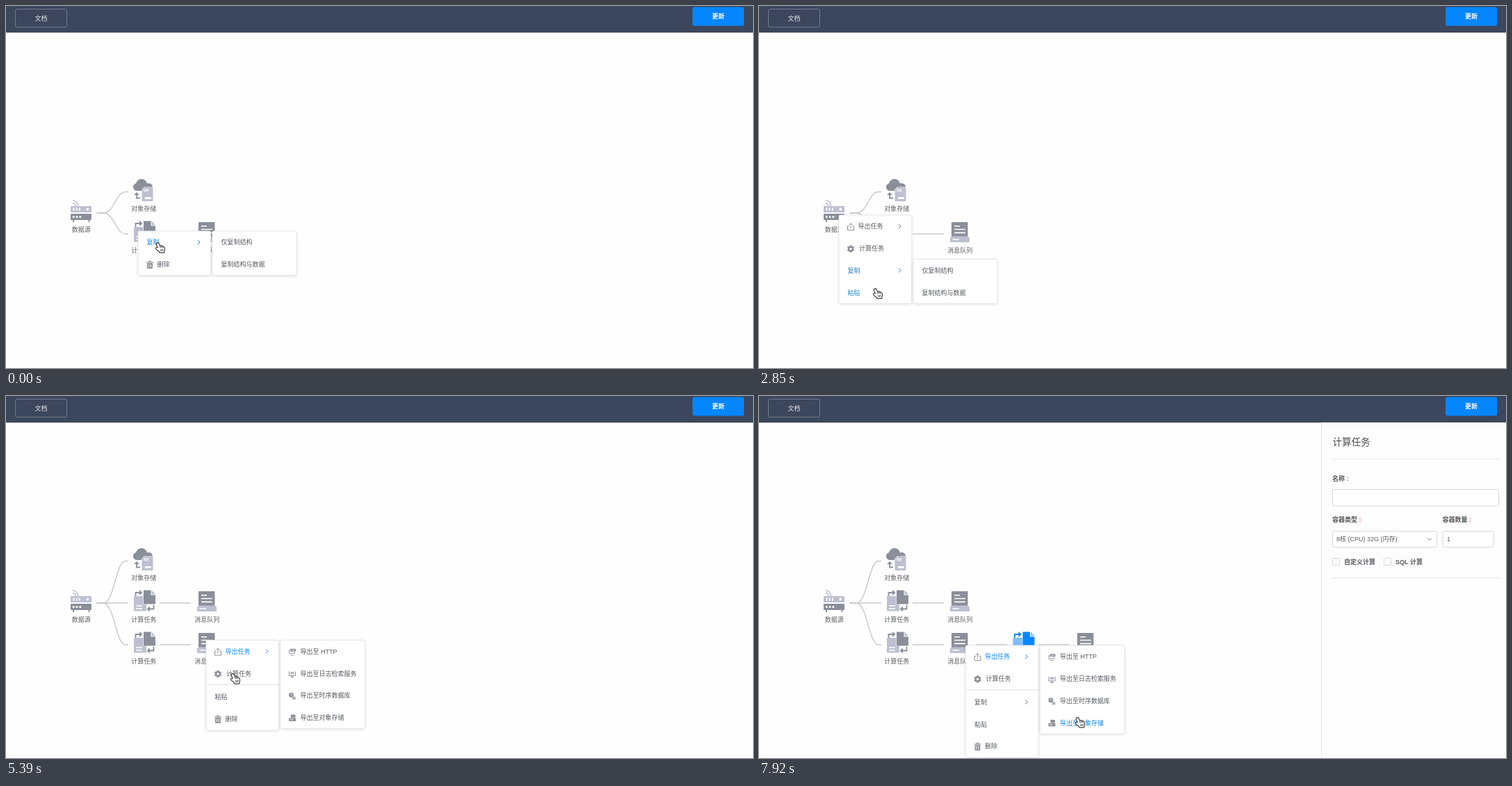
An HTML page with a canvas that plays this animation: 1075x521 px, repeating every 8 s.

```html
<!DOCTYPE html>
<html lang="zh-CN">
<head>
<meta charset="utf-8">
<title>数据流编辑</title>
<style>
html, body { margin: 0; width: 100%; height: 100%; overflow: hidden; background: #fefefe; }
canvas { display: block; width: 1075px; height: 521px; }
</style>
</head>
<body>
<canvas id="stage"></canvas>
<script>
const W = 1075, H = 521, LOOP = 8000;
const canvas = document.getElementById('stage');
const ratio = window.devicePixelRatio || 1;
canvas.width = W * ratio;
canvas.height = H * ratio;
const c = canvas.getContext('2d');
const FONT = '"Liberation Sans", "Noto Sans CJK SC", "Noto Sans CJK", sans-serif';
const BLUE = '#0b87f3', INK = '#555a60';
const GREY = { dark: '#8a8f99', light: '#bdc0d0', label: '#5c5e62' };
const HOT = { dark: '#000', light: '#898d97', label: '#000' };
const PICKED = { dark: '#0a86ff', light: '#82bdff', label: '#0a86ff' };

// Screen updates come in bursts: [first, last, count]
const BURSTS = [[140, 1070, 7], [1220, 2260, 8], [2410, 3440, 8], [3620, 4650, 8],
  [4800, 5830, 8], [5980, 7020, 8], [7170, 7920, 6]];
const SLACK = 8; // updates fall on rounded times

// Pointer keys: time, x, y, shape (a arrow, h hand, m arrow with menu)
const POINTER = [[0, 222, 348, 'h'], [200, 222, 348, 'h'], [590, 316, 364, 'h'], [890, 312, 364, 'a'],
  [1370, 312, 364, 'a'], [1940, 117, 308, 'h'], [2240, 117, 308, 'm'], [2400, 135, 326, 'h'],
  [2690, 168, 380, 'h'], [2840, 171, 414, 'h'], [3420, 171, 414, 'a'], [3620, 171, 414, 'a'],
  [4200, 288, 353, 'h'], [4640, 288, 353, 'h'], [4790, 290, 357, 'm'], [4940, 310, 366, 'h'],
  [5090, 328, 372, 'h'], [5240, 328, 374, 'h'], [5380, 330, 407, 'h'], [5810, 330, 407, 'a'],
  [5980, 330, 407, 'a'], [6410, 296, 365, 'h'], [6560, 296, 365, 'm'], [6740, 296, 365, 'm'],
  [6860, 320, 372, 'h'], [7010, 345, 378, 'h'], [7320, 375, 378, 'h'], [7470, 425, 384, 'h'],
  [7620, 448, 412, 'h'], [7770, 460, 443, 'h'], [7920, 462, 470, 'h'], [8000, 462, 470, 'h']];

function snap(t) {
  let q = 0;
  for (const [a, b, n] of BURSTS) {
    if (t + SLACK < a) break;
    const step = (b - a) / (n - 1);
    q = a + Math.min(n - 1, Math.floor((t + SLACK - a) / step)) * step;
  }
  return q;
}

function box(x, y, w, h, fill, r = 0, stroke) {
  c.beginPath();
  c.roundRect(x, y, w, h, r);
  if (fill) { c.fillStyle = fill; c.fill(); }
  if (stroke) { c.strokeStyle = stroke; c.lineWidth = 1; c.stroke(); }
}

function dot(x, y, r, fill) {
  c.beginPath();
  c.arc(x, y, r, 0, 7);
  c.fillStyle = fill;
  c.fill();
}

function line(d, color, width = 1) {
  c.strokeStyle = color;
  c.lineWidth = width;
  c.stroke(new Path2D(d));
}

function shape(d, fill) {
  c.fillStyle = fill;
  c.fill(new Path2D(d));
}

function text(s, x, y, color = INK, size = 9, weight = 400, align = 'left') {
  c.font = `${weight} ${size}px ${FONT}`;
  c.textAlign = align;
  c.fillStyle = color;
  c.fillText(s, x, y + size * 0.38);
}

function at(x, y, draw) {
  c.save();
  c.translate(x, y);
  draw();
  c.restore();
}

// Node icons, relative to the centre of the node's row
const ICONS = {
  source(p) {
    line('M-12 -14.5A4.5 4.5 0 0 1 -8 -10M-12 -18.5A8.5 8.5 0 0 1 -4.5 -10', p.light, 1.4);
    box(-15, -10, 30, 9, p.light, 1);
    for (const x of [-11.5, -7.3, -3.1]) box(x, -7.7, 1.9, 4.4, '#fff');
    dot(9.3, -5.5, 1.9, '#fff');
    box(-15, 1, 30, 9, p.dark, 1);
    for (const x of [-10.8, -6, -1.2]) dot(x, 5.4, 1.5, '#fff');
    box(-12, 10, 2, 3, p.dark);
    box(10.5, 10, 2, 3, p.dark);
  },
  storage(p) {
    dot(-9.5, -7, 5.5, p.dark);
    dot(-3, -10.2, 8.3, p.dark);
    dot(7.3, -7, 5.6, p.dark);
    box(-9.5, -9, 17, 7.5, p.dark);
    shape('M1 -7H13.3L14 -6.3V14H-3V-3Z', '#fff');
    shape('M1.3 -6.5H12.5Q13.5 -6.5 13.5 -5.5V12.5Q13.5 13.5 12.5 13.5H-2.5V-2.7Z', p.light);
    for (const x of [.5, 3, 5.5]) box(x, -4.5, 1.3, 4.5, '#fff');
    box(2, 7.5, 9, 2.8, '#fff');
    line('M-5 9H-10V3', p.dark, 1.8);
    shape('M-14 4.5L-10 .5L-6 4.5Z', p.dark);
  },
  compute(p) {
    box(-14, -10, 18, 21.5, p.light, 1);
    line('M-11 4H-2M-11 8H-2', '#fff', 1.5);
    shape('M-.6 -19H11L17.5 -12V2H-.6Z', '#fff');
    shape('M0 -18.5H10.5V-11.5H17V1.5H0Z', p.dark);
    shape('M11.5 -18.5L17 -12.5H11.5Z', p.light);
    line('M-11.5 -10V-15H-5', p.dark, 1.8);
    shape('M-6 -19L-1.5 -15L-6 -11Z', p.dark);
    line('M14.5 3V8.5H8', p.dark, 1.8);
    shape('M9 4.5L4.5 8.5L9 12.5Z', p.dark);
  },
  queue(p) {
    shape('M-11.5 3H11.5L14 6V12H-14V6Z', p.light);
    box(-12, -17, 23.5, 20.5, p.dark, 1);
    line('M-8 -11.2H0M-8 -6.5H8M-8 -1.6H8', '#fff', 1.6);
    line('M-10.5 8H-1', '#fff', 1.5);
  }
};

function node(kind, label, x, y, p = GREY) {
  at(x, y, () => ICONS[kind](p));
  text(label, x + .3, y + 24, p.label, 9, 400, 'center');
}

function branch(y) {
  line(`M130.5 298H140C156 298 158 ${y} 172 ${y}H176`, '#c9c9cb', 1.4);
}

function link(x, y) {
  line(`M${x} ${y}h45`, '#c9c9cb', 1.4);
}

function flow(q) {
  const copied = q >= 3740, added = q >= 5810;
  const source = q >= 1800 && q < 2240 ? HOT : GREY;
  const queue = (q >= 4190 && q < 4780) || (q >= 6400 && q < 6850) ? HOT : GREY;
  const top = copied ? 237.5 : 267.5, mid = copied ? 298 : 328;
  branch(top);
  branch(mid);
  link(221, mid);
  if (copied) { branch(358); link(221, 358); }
  if (added) { link(312, 358); link(402, 358); }
  node('source', '数据源', 108, 298, source);
  node('storage', '对象存储', 198, top);
  node('compute', '计算任务', 198, mid);
  node('queue', '消息队列', 289, mid);
  if (copied) {
    node('compute', '计算任务', 198, 358);
    node('queue', '消息队列', 289, 358, queue);
  }
  if (added) {
    node('compute', '计算任务', 379.5, 358, PICKED);
    node('queue', '消息队列', 470, 358);
  }
}

// Small menu icons
const GLYPHS = {
  share() {
    line('M-2.5 -1H-4.5V5H4.5V-1H2.5M0 2V-4.5M-2.5 -2.5L0 -5L2.5 -2.5', '#8d9097', 1);
  },
  gear() {
    for (let i = 0; i < 3; i++) {
      c.save();
      c.rotate(i * Math.PI / 3);
      box(-1.4, -5.2, 2.8, 10.4, '#8d9097', .5);
      c.restore();
    }
    dot(0, 0, 4, '#8d9097');
    dot(0, 0, 1.7, '#fff');
  },
  trash() {
    line('M-5 -3.5H5M-2 -5H2', '#96999f', 1.2);
    box(-4, -2.5, 8, 8, '#96999f', .8);
    line('M-1.5 -.5V3.5M1.5 -.5V3.5', '#fff', .9);
  },
  web() {
    line('M-4.5 -2.5V2.5H3.5V0M-2.5 5H2', '#92959d', 1);
    box(-3, -4.5, 8, 4, '#92959d', .5);
    line('M-1 -2.5H3', '#fff', .7);
  },
  log() {
    line('M-4.5 -3.5V2.5H4.5V-3.5M-2.5 5H2.5', '#92959d', 1.1);
    box(-2.5, -3, 5, 3.5, '#b4b7c0');
    box(-.7, 2, 1.4, 3, '#92959d');
  },
  clock() {
    dot(-1.5, -1.5, 3.5, '#92959d');
    line('M-1.5 -3.5V-1.5H0', '#fff', .8);
    box(0, 1, 5, 4, '#b0b3bc', .5);
  },
  store() {
    box(-2, -5, 6.5, 4.5, '#8d9097', .5);
    box(-5, 0, 10, 4.5, '#8d9097', .5);
    line('M-3 2.3H1', '#fff', .9);
  }
};

function card(x, y, w, h) {
  c.save();
  c.shadowColor = 'rgba(0,0,0,.15)';
  c.shadowBlur = 4;
  c.shadowOffsetY = 1;
  box(x, y, w, h, '#fff', 2);
  c.restore();
  box(x, y, w, h, null, 2, '#e9eaed');
}

// Rows: [label, icon, has submenu]; null is a divider
function menu(x, y, w, rows, lit, indent = 27.5) {
  const count = rows.filter(Boolean).length;
  card(x, y, w, count * 31.75 + (count < rows.length ? 2.5 : 0));
  let mid = y + 16;
  for (const row of rows) {
    if (!row) {
      line(`M${x} ${mid - 15.5}h${w}`, '#dfe1e5');
      mid += 2;
      continue;
    }
    const [label, icon, more] = row;
    const color = lit[label] || INK;
    if (icon) at(x + 17, mid + .7, GLYPHS[icon]);
    text(label, x + (icon ? indent + (icon === 'gear' ? 1.5 : 0) : 12.5), mid, color);
    if (more) line(`M${x + 86} ${mid - 3}l3 3l-3 3`, color === INK ? '#6d7075' : color);
    mid += 31.75;
  }
}

function popup(q, start, x, y, rows, lit) {
  c.save();
  if (q < start + 130) {
    c.globalAlpha = .6;
    c.translate(0, y);
    c.scale(1, .95);
    c.translate(0, -y);
  }
  menu(x, y, 104.5, rows, lit);
  c.restore();
}

const EXPORT = ['导出任务', 'share', true], COMPUTE = ['计算任务', 'gear'];
const COPY = ['复制', null, true], PASTE = ['粘贴'], REMOVE = ['删除', 'trash'];
const COPY_KINDS = [['仅复制结构'], ['复制结构与数据']];
const TARGETS = [['导出至 HTTP', 'web'], ['导出至日志检索服务', 'log'],
  ['导出至时序数据库', 'clock'], ['导出至对象存储', 'store']];
const lit = (label, on, color = BLUE) => on && label ? { [label]: color } : {};

function menus(q) {
  if (q < 880) {
    menu(190, 324, 104.5, [COPY, REMOVE], lit('复制', true));
    menu(297, 324, 121, COPY_KINDS, lit('复制结构与数据', q >= 570));
  } else if (q >= 2240 && q < 3420) {
    const open = q >= 2680 && q < 2980;
    popup(q, 2240, 115, 301, [EXPORT, COMPUTE, COPY, PASTE], {
      ...lit('导出任务', q >= 2390 && q < 2540),
      ...lit('复制', open, q < 2830 ? BLUE : '#2c7fbd'),
      ...lit('粘贴', q >= 2830, q < 2980 ? '#1c86d3' : BLUE)
    });
    if (open) menu(222, 364.5, 121, COPY_KINDS, {});
  } else if (q >= 4780 && q < 5810) {
    popup(q, 4780, 288, 351.5, [EXPORT, COMPUTE, null, PASTE, REMOVE], {
      ...lit('导出任务', q >= 5070 && q < 5520),
      ...lit('计算任务', q >= 5520)
    });
    if (q >= 5220 && q < 5520) menu(395, 351.5, 121.5, TARGETS, {}, 28.5);
  } else if (q >= 6550) {
    popup(q, 6550, 297.5, 359, [EXPORT, COMPUTE, null, COPY, PASTE, REMOVE],
      lit('导出任务', q >= 7160));
    if (q >= 7300) {
      const row = q < 7460 ? -1 : Math.min(3, Math.floor((q - 7460) / 150) + 0);
      menu(404.5, 359, 121.5, TARGETS, lit(TARGETS[row] && TARGETS[row][0], true), 28.5);
    }
  }
}

function header() {
  box(0, 38, W, 1, '#c4c7cd');
  box(0, 0, W, 38, '#3c465d');
  box(0, 37, W, 1, '#384156');
  box(13.5, 4.5, 74, 26, null, 2.5, '#737b8b');
  text('文档', 50.5, 17.3, '#e6e8ec', 9, 400, 'center');
  box(988, 1.5, 74, 27, '#0486fe', 2.5);
  text('更新', 1025, 15, '#fff', 9, 700, 'center');
}

function toast(q) {
  if (q < 1050 || q >= 2690) return;
  const fading = q < 1200 || q >= 2540;
  c.save();
  if (fading) { c.globalAlpha = .55; c.translate(0, -2); }
  box(499, 4.5, 77, 25.5, '#fff', 2);
  dot(516.8, 17.2, 5.6, '#0aab4c');
  line('M514.2 17.3l2 2l3.4 -3.6', '#fff', 1.2);
  text('复制成功', 528.3, 17.3);
  c.restore();
}

function field(label, x, y) {
  text(label, x, y, '#55585d', 9, 700);
  text(':', x + label.length * 9 + 2.5, y, '#f0453c', 9, 700);
}

function panel(q) {
  if (q < 5810) return;
  c.save();
  if (q < 5960) c.globalAlpha = .5;
  box(810, 38, 265, 483, '#fdfdfd');
  line('M809.5 38V521', '#e4e5e8');
  text('计算任务', 825.5, 65.5, '#4a4d52', 13.5, 500);
  line('M825 91H1065M825 262H1065', '#e4e5e8');
  field('名称', 825, 118.3);
  box(825.5, 134.5, 239, 23.5, '#fff', 2, '#d4d6da');
  field('容器类型', 825, 177.8);
  field('容器数量', 983.5, 177.8);
  box(825.5, 194.5, 150, 23, '#fff', 2, '#d4d6da');
  text('8核 (CPU) 32G (内存)', 831, 206);
  line('M962 204.5l3 3l3 -3', '#777a80');
  box(984, 194.5, 73, 23, '#fff', 2, '#d4d6da');
  text('1', 990, 206);
  box(825.5, 233.5, 10, 10, '#fff', 1, '#d4d6da');
  text('自定义计算', 842, 238.3, '#55585d', 9, 700);
  box(899.5, 233.5, 10, 10, '#fff', 1, '#d4d6da');
  text('SQL 计算', 916, 238.3, '#55585d', 9, 700);
  c.restore();
}

function outlined(d, fill, stroke, width) {
  line(d, stroke, width);
  shape(d, fill);
}

const HAND = 'M-4.6 -6.6Q-2.9 -7.4 -2.1 -5.7L-.7 -2.5Q.5 -3.2 1.5 -2.2Q2.8 -2.8 3.6 -1.6' +
  'Q5 -1.9 5.6 -.4Q6.6 2 5.6 4.2L5.4 6.6H-.8L-1.6 5Q-4 3.4 -6 1.2Q-6.4 -.6 -4 0L-3 .6L-5.2 -4.8Q-5.6 -6 -4.6 -6.6Z';
const ARROW = 'M-1 -7V4.4L1.6 2L3.5 6.4L5.6 5.5L3.7 1.2H7.2Z';

function pointer(q) {
  let i = POINTER.length - 2;
  while (i && POINTER[i][0] > q) i--;
  const [t0, x0, y0, kind] = POINTER[i], [t1, x1, y1] = POINTER[i + 1];
  const k = (q - t0) / (t1 - t0);
  at(x0 + (x1 - x0) * k, y0 + (y1 - y0) * k, () => {
    c.lineJoin = 'round';
    if (kind === 'h') {
      outlined(HAND, '#fff', '#111', 1.9);
      line('M-.7 -2.5L.3 .2M1.5 -2.2L2.2 0M3.6 -1.6L4 .4M.5 2.4L.9 4.8M2.3 2.2L2.5 4.6M4 2V4.3', '#111', .8);
    } else {
      outlined(ARROW, '#000', '#fff', 1.6);
      if (kind === 'm') {
        box(5.5, -2, 7.5, 8, '#fff', .5, '#111');
        line('M7 0H11.5M7 2H11.5M7 4H11.5', '#111', 1);
      }
    }
  });
}

function draw(now) {
  const q = snap(now % LOOP);
  c.setTransform(ratio, 0, 0, ratio, 0, 0);
  box(0, 0, W, H, '#fefefe');
  header();
  flow(q);
  panel(q);
  menus(q);
  toast(q);
  pointer(q);
}

let begin;
function tick(now) {
  if (begin === undefined) begin = now;
  draw(now - begin);
  requestAnimationFrame(tick);
}
draw(0);
requestAnimationFrame(tick);
</script>
</body>
</html>
```
